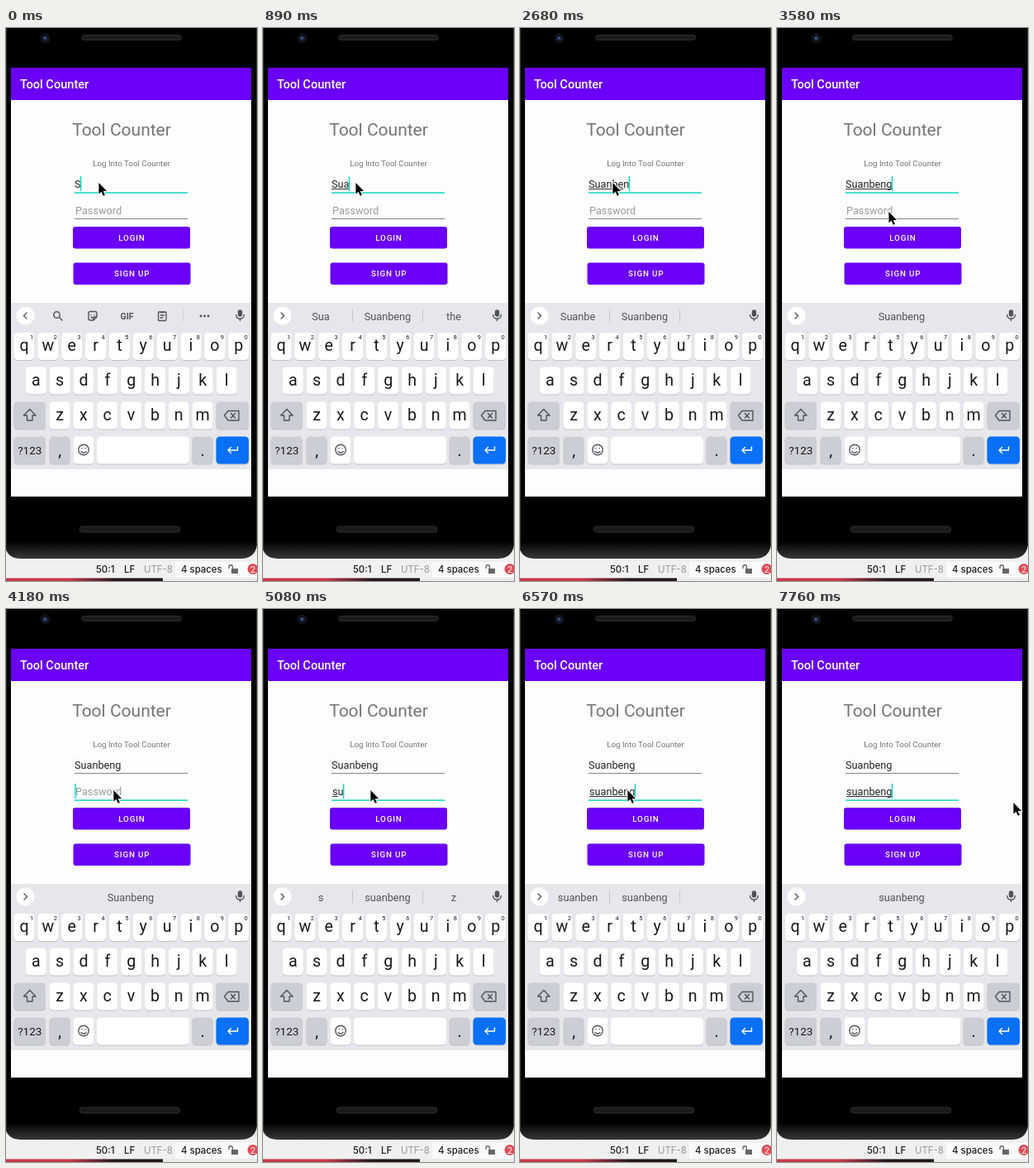
These frames come from a looping animation (304 px wide and 668 px high, 8 s). An HTML page:

```html
<!DOCTYPE html>
<html lang="en">
<head>
<meta charset="utf-8">
<title>Login form</title>
<style>
  html, body { margin: 0; width: 100%; height: 100%; overflow: hidden; background: #ededed; }
  svg { display: block; width: 304px; height: 668px; font-family: Roboto, sans-serif; }
  text { white-space: pre; }
  .mid { text-anchor: middle; }
  .icon { fill: none; stroke: #50545a; stroke-width: 1.4; stroke-linecap: round; stroke-linejoin: round; }
  .ide { font: 500 11.4px Inter, sans-serif; fill: #1c1c1c; }
  .button { font-size: 9.8px; font-weight: 500; letter-spacing: .85px; fill: #fff; }
</style>
</head>
<body>
<svg id="stage" viewBox="0 0 304 668">
  <defs>
    <linearGradient id="bar" x2="0" y2="1">
      <stop offset="0" stop-color="#c8c8c8"/><stop offset=".35" stop-color="#f0f0f0"/>
    </linearGradient>
    <linearGradient id="strip">
      <stop offset=".4" stop-color="#c63a4c"/><stop offset=".7" stop-color="#21171a"/>
    </linearGradient>
    <linearGradient id="body" gradientUnits="userSpaceOnUse" x1="0" y1="620" x2="0" y2="641">
      <stop offset="0" stop-color="#000"/><stop offset="1" stop-color="#383838"/>
    </linearGradient>
  </defs>

  <!-- Editor status bar behind the phone -->
  <rect y="620" width="304" height="48" fill="url(#bar)"/>
  <rect x="205" y="645" width="99" height="19" fill="#fafafa"/>
  <rect y="664.500" width="190" height="3.500" fill="url(#strip)"/>
  <rect x="190" y="664.500" width="114" height="3.500" fill="#eceaea"/>
  <g class="ide">
    <text x="109" y="658">50:1</text>
    <text x="143" y="658">LF</text>
    <text x="167" y="658" fill="#989898" font-weight="400">UTF-8</text>
    <text x="212" y="658">4 spaces</text>
  </g>
  <rect x="273" y="653" width="8" height="6" fill="#666"/>
  <path d="M270 653V651a2.2 2.2 0 0 1 4.500 0V653" fill="none" stroke="#666" stroke-width="1.3"/>
  <circle cx="299" cy="653.500" r="6.500" fill="#e14c55"/>
  <text x="299" y="657.500" class="mid" font-size="11" fill="#fff">2</text>

  <!-- Phone -->
  <path d="M0 0H304V624Q302 641 284 641H18Q4 641 0 630Z" fill="url(#body)"/>
  <path d="M.5 0V630M303.500 0V624" stroke="#303030"/>
  <g fill="#1b1b1b" stroke="#2e2e2e">
    <rect x="91.500" y="8.500" width="121" height="6" rx="3"/>
    <rect x="89.500" y="602" width="121" height="7" rx="3"/>
  </g>
  <circle cx="47.500" cy="12.500" r="6" fill="#10131b"/>
  <circle cx="47.500" cy="12.500" r="2.600" fill="#22345c"/>
  <circle cx="47" cy="12" r="1" fill="#5a70a4"/>
  <rect x="6" y="48" width="291" height="518" fill="#fdfdfd"/>

  <!-- Form -->
  <rect x="6" y="48" width="291" height="39" fill="#6a00f8"/>
  <text x="17" y="73" font-size="14.6" font-weight="500" fill="#fff">Tool Counter</text>
  <text x="140" y="130" class="mid" font-size="21" fill="#757575">Tool Counter</text>
  <text x="152" y="166.500" class="mid" font-size="9.8" fill="#757575">Log Into Tool Counter</text>
  <g fill="#6a00f8">
    <rect x="81" y="240" width="142" height="26.500" rx="3"/>
    <rect x="81.500" y="283.500" width="142" height="26.500" rx="3"/>
  </g>
  <text x="152.400" y="257.200" class="mid button">LOGIN</text>
  <text x="152.700" y="300.400" class="mid button">SIGN UP</text>
  <g id="fields"></g>

  <!-- Keyboard -->
  <rect x="6" y="332" width="291" height="201" fill="#e5e7eb"/>
  <g id="keys"></g>
  <circle cx="23.500" cy="347.500" r="11" fill="#fff"/>
  <path id="chevron" class="icon"/>
  <g class="icon">
    <rect x="281.500" y="341" width="4" height="7" rx="2" fill="#50545a"/>
    <path d="M278.700 346.500a4.800 4.800 0 0 0 9.600 0M283.500 351.500V353.500"/>
  </g>
  <g id="toolbar">
    <g class="icon">
      <circle cx="61.500" cy="346.500" r="3.800"/><path d="M64.500 349.500L68 353"/>
      <path d="M110 349V344.500a2 2 0 0 0-2-2H102a2 2 0 0 0-2 2V351a2 2 0 0 0 2 2H106ZM106 353V349H110M103 346.500V346.600M107 346.500V346.600M103 349.300Q104 350.500 105 350"/>
      <rect x="184.500" y="343" width="9.500" height="10.500" rx="1"/>
      <path d="M187 343.500H191.500M187 347H191.500M187 350H190"/>
    </g>
    <text x="146.500" y="352" class="mid" font-size="10.5" font-weight="700" fill="#50545a">GIF</text>
    <path d="M214.500 340V355" stroke="#d0d3d7"/>
    <g fill="#50545a"><circle cx="236" cy="348" r="1.400"/><circle cx="240.500" cy="348" r="1.400"/><circle cx="245" cy="348" r="1.400"/></g>
  </g>
  <path id="dividers" d="M108.500 340V355M193.500 340V355" stroke="#c3c6cb"/>
  <g id="words" class="mid" font-size="12.7" fill="#505358"></g>

  <path id="mouse" d="M.4 .9V14.600L3.500 11.700L5.800 16.700L7.900 15.700L5.700 10.900H10Z" fill="#000" stroke="#fff" stroke-width="1.8" paint-order="stroke"/>
</svg>

<script>
const LOOP = 8000;
const $ = id => document.getElementById(id);

function setAttrs(node, attrs) {
  for (const key in attrs) node.setAttribute(key, attrs[key]);
}

function add(parent, tag, attrs, content = '') {
  const node = document.createElementNS('http://www.w3.org/2000/svg', tag);
  setAttrs(node, attrs);
  node.textContent = content;
  return parent.appendChild(node);
}

// Keyboard
const keys = $('keys');
function drawKey(x, y, width, fill = '#fff') {
  add(keys, 'rect', { x, y: y + 1, width, height: 33, rx: 4.5, fill: '#bfc2c7' });
  add(keys, 'rect', { x, y, width, height: 33, rx: 4.5, fill });
}
function keyLabel(x, y, label, size = 19.6) {
  add(keys, 'text', { x, y, class: 'mid', 'font-size': size, fill: '#17181a' }, label);
}
function drawRow(letters, firstX, y, numbered) {
  [...letters].forEach((letter, i) => {
    const x = firstX + i * 28.85;
    drawKey(x - 12.5, y, 25);
    keyLabel(x, y + 22.4, letter);
    if (numbered) keyLabel(x + 9, y + 8, (i + 1) % 10, 7.5);
  });
}
const GRAY = '#cbced4';
drawRow('qwertyuiop', 22, 368, true);
drawRow('asdfghjkl', 36.3, 409.5);
drawRow('zxcvbnm', 65, 451.5);
drawKey(9.5, 451.5, 38.5, GRAY);
drawKey(254.5, 451.5, 39.5, GRAY);
drawKey(9.5, 493.5, 38.5, GRAY);
drawKey(52.5, 493.5, 25, GRAY);
drawKey(81.5, 493.5, 25);
drawKey(110, 493.5, 112);
drawKey(225.5, 493.5, 25, GRAY);
drawKey(254.5, 493.5, 39.5, '#0a70f5');
keyLabel(28.8, 514.6, '?123', 13.5);
keyLabel(65.3, 517, ',');
keyLabel(238, 517, '.');
[
  'M28.800 460.500L36 468H32V474H25.500V468H21.500Z',
  'M264.500 468L269 462.500H282V474H269ZM272.500 465.500L277.500 471M277.500 465.500L272.500 471',
  'M87.800 509.500a6.200 6.200 0 1 0 12.400 0a6.200 6.200 0 1 0-12.400 0M91 511.500Q94 515 97 511.500M91.900 507.500V507.800M96.100 507.500V507.800'
].forEach(d => add(keys, 'path', { d, class: 'icon' }));
add(keys, 'path', { d: 'M280.500 506V510H269M272.500 506.500L269 510L272.500 513.500', class: 'icon', style: 'stroke:#fff' });

// Form fields
const TEAL = '#12d6c4';
function makeField(x, top, hint) {
  const group = $('fields');
  return {
    x, hint,
    line: add(group, 'rect', { x: 83, width: 137 }),
    label: add(group, 'text', { x, y: top + 14, 'font-size': 12.7 }),
    mark: add(group, 'rect', { x, y: top + 15, height: 1, fill: '#333' }),
    caret: add(group, 'rect', { y: top, width: 1.5, height: 18, fill: TEAL }),
    bottom: top + 20
  };
}
const fields = [makeField(83, 179, ''), makeField(84, 211, 'Password')];
const wordNodes = [70, 151, 231].map(x => add($('words'), 'text', { x, y: 353 }));

// Each step changes only the listed parts of the state.
const NAME = 'Suanbeng', LOWER = NAME.toLowerCase();
const low = (n, third) => [LOWER.slice(0, n), LOWER, third];
const cap = (n, third) => [NAME.slice(0, n), NAME, third];
const steps = [
  [0, { name: 1, pass: 0, marked: 0, words: null, focus: 0, caret: true, mouse: [112, 186] }],
  [300, { name: 2, marked: 1, words: cap(1, 'Z') }],
  [590, { name: 3, marked: 2, words: cap(2, 'the') }],
  [890, { marked: 3, words: cap(3, 'the') }],
  [1190, { name: 4 }],
  [1340, { marked: 4 }],
  [1490, { words: cap(4, 'When') }],
  [1940, { caret: false }],
  [2240, { name: 5, caret: true }],
  [2390, { name: 6, marked: 5, words: cap(5, '') }],
  [2540, { marked: 6 }],
  [2680, { name: 7, words: cap(6, '') }],
  [2980, { name: 8, marked: 7, words: cap(7, '') }],
  [3130, { marked: 8 }],
  [3430, { words: ['', NAME, ''], mouse: [124, 203] }],
  [3580, { mouse: [135, 221] }],
  [3730, { mouse: [133, 220] }],
  [3880, { mouse: [130, 218] }],
  [4180, { focus: 1, marked: 0 }],
  [4330, { words: null }],
  [4630, { caret: false }],
  [4930, { pass: 1, caret: true }],
  [5080, { pass: 2, marked: 1, words: low(1, 'z') }],
  [5230, { pass: 3, marked: 2, words: low(2, 'the') }],
  [5380, { pass: 4, marked: 3, words: low(3, 'the') }],
  [5680, { marked: 4, words: low(4, 'when') }],
  [6130, { pass: 5 }],
  [6280, { pass: 6, marked: 5, words: low(5, '') }],
  [6430, { pass: 7, marked: 6, words: low(6, '') }],
  [6570, { pass: 8, marked: 8, words: low(7, '') }],
  [6870, { words: ['', LOWER, ''] }],
  [7310, { mouse: [146, 221] }],
  [7460, { mouse: [204, 227] }],
  [7610, { mouse: [266, 233] }],
  [7760, { mouse: [286, 233] }]
];

function show(node, visible) {
  node.setAttribute('visibility', visible ? 'visible' : 'hidden');
}

function drawField(field, value, focused, state) {
  const { label, line, mark, caret, x, bottom, hint } = field;
  label.textContent = value || hint;
  label.setAttribute('fill', value ? '#222' : '#9b9b9b');
  setAttrs(line, focused
    ? { y: bottom - .7, height: 1.5, fill: TEAL }
    : { y: bottom - 1, height: 1, fill: '#858585' });
  const marked = focused && value ? Math.min(state.marked, value.length) : 0;
  mark.setAttribute('width', marked ? label.getSubStringLength(0, marked) : 0);
  caret.setAttribute('x', x - .7 + (value ? label.getComputedTextLength() : 0));
  show(caret, focused && state.caret);
}

function render(time) {
  const state = {};
  for (const [start, change] of steps) if (start <= time) Object.assign(state, change);
  const { words, mouse } = state;
  drawField(fields[0], NAME.slice(0, state.name), state.focus === 0, state);
  drawField(fields[1], LOWER.slice(0, state.pass), state.focus === 1, state);
  wordNodes.forEach((node, i) => { node.textContent = words ? words[i] : ''; });
  show($('toolbar'), !words);
  show($('dividers'), words && words[0]);
  $('chevron').setAttribute('d', words ? 'M22 344L25.500 347.500L22 351' : 'M25 344L21.500 347.500L25 351');
  $('mouse').setAttribute('transform', `translate(${mouse})`);
}

function tick(now) {
  render(now % LOOP);
  requestAnimationFrame(tick);
}
render(0);
requestAnimationFrame(tick);
</script>
</body>
</html>
```
